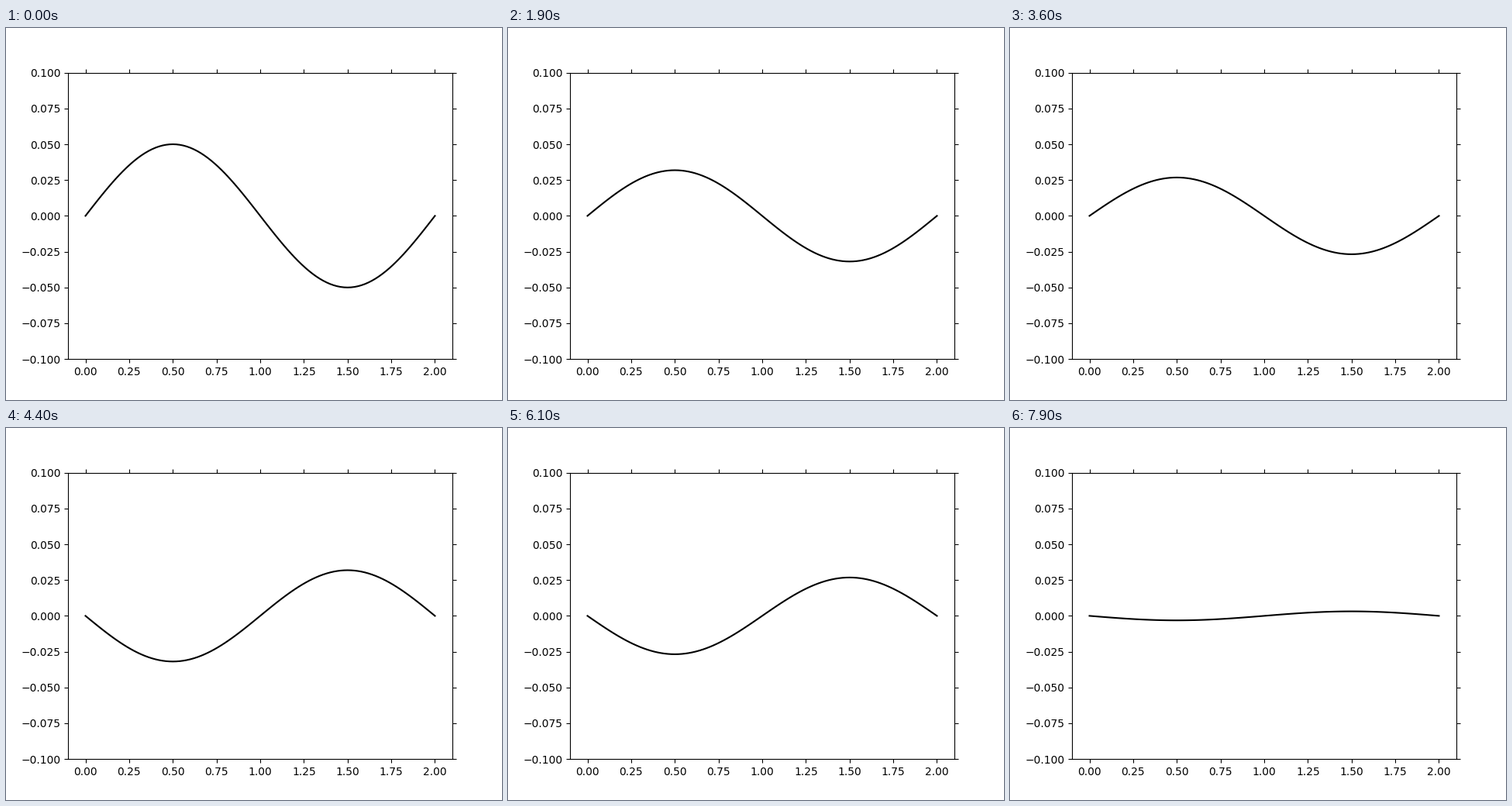
Recreate the animation shown at these times as a matplotlib script. Size 640x480 px, loop 8 s.

```python
import numpy as np
import matplotlib.pyplot as plt
from matplotlib.animation import FuncAnimation

FRAMES = 80
INTERVAL = 100            # ms
AMPLITUDE = 0.05
OMEGA = 3 * np.pi / 25    # phase advance per frame

fig, ax = plt.subplots(figsize=(6.4, 4.8), dpi=100)
ax.set_xlim(-0.1, 2.1)
ax.set_ylim(-0.1, 0.1)
ax.tick_params(top=True, right=True)

x = np.linspace(0, 2, 101)
mode = AMPLITUDE * np.sin(np.pi * x)
line, = ax.plot(x, mode, color="black", lw=1.5)


def update(n):
    line.set_ydata(mode * np.cos(OMEGA * n))
    return line,


anim = FuncAnimation(fig, update, frames=FRAMES, interval=INTERVAL,
                     repeat=True, repeat_delay=0)
plt.show()
```
